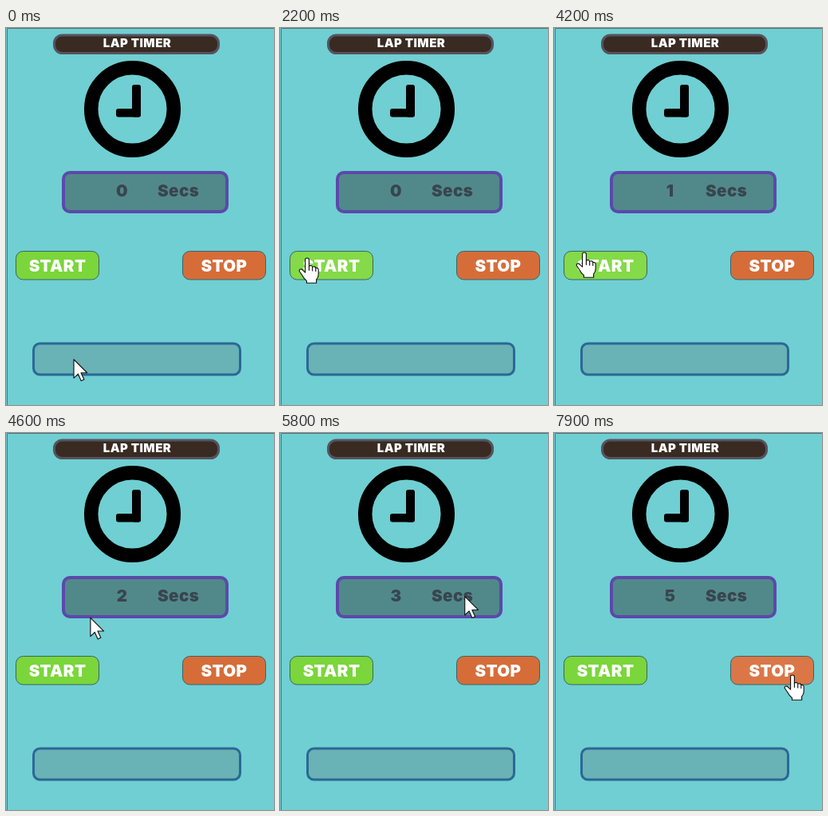
These frames come from a looping animation (336 px wide and 472 px high, 8 s). An HTML page:

```html
<!DOCTYPE html>
<html lang="en">
<head>
<meta charset="utf-8">
<title>Lap timer</title>
<style>
  html, body { margin: 0; width: 100%; height: 100%; overflow: hidden; background: #6fcfd2; }
  svg { display: block; width: 336px; height: 472px; }
  text { font: 900 20.5px Inter, "DejaVu Sans", sans-serif; letter-spacing: .02em; fill: #fff; }
  .middle { text-anchor: middle; }
  .title { font-size: 15px; letter-spacing: .03em; }
  .readout { fill: #38454f; }
  .button { stroke: #3c626b; stroke-width: 1; }
  .pointer { fill: #fff; stroke: #111; stroke-width: .8; stroke-linejoin: round; stroke-linecap: round; }
</style>
</head>
<body>
<svg viewBox="0 0 336 472">
  <rect width="336" height="472" fill="#6fcfd2"/>
  <path d="M336 .5H1.5V472" fill="none" stroke="#53717c"/>

  <rect x="60.5" y="9" width="206" height="22.5" rx="10" fill="#392b22" stroke="#56535f" stroke-width="3"/>
  <text class="title middle" x="164.5" y="24">LAP TIMER</text>

  <circle cx="158.5" cy="101.5" r="51.8" fill="none" stroke="#000" stroke-width="17.5"/>
  <rect x="158" y="71" width="11" height="40.5" rx="3"/>
  <rect x="138" y="101" width="31" height="10.5" rx="3"/>

  <rect x="72" y="181" width="205" height="49" rx="8" fill="#51898a" stroke="#5b49aa" stroke-width="4"/>
  <text id="count" class="readout middle" x="145.5" y="211">0</text>
  <text class="readout" x="190" y="211">Secs</text>

  <rect id="start" class="button" x="12.5" y="279.5" width="104" height="35.5" rx="9"/>
  <text class="middle" x="64.5" y="305">START</text>
  <rect id="stop" class="button" x="221.5" y="279.5" width="104" height="35.5" rx="9"/>
  <text class="middle" x="273.5" y="305">STOP</text>

  <rect x="34.5" y="395" width="259" height="39" rx="8" fill="#69b2b5" stroke="#2b6896" stroke-width="3"/>

  <g id="cursor" class="pointer">
    <path id="arrow" d="M0 0V16.4L3.8 12.8 6.5 18.8 9.1 17.6 6.4 11.8H11.8Z"/>
    <g id="hand">
      <path d="M-1.7 1.5Q-1.7 0 0 0T1.7 1.5V7Q4.2 6 4.7 7.8Q7.2 7 7.6 8.8Q10 8.4 10 10.6V14.5Q10 17 8.2 19V22H-.4V20.2Q-3 18-4.5 15L-6.7 11.8Q-7.3 10.4-6 9.9T-3.4 11.2L-1.7 12.8Z"/>
      <path fill="none" d="M1.7 7V10.8M4.7 7.8V11.2M7.6 8.8V11.6"/>
    </g>
  </g>
</svg>
<script>
const LOOP = 8000, STEP = 100;
const el = id => document.getElementById(id);
const [count, start, stop, cursor, arrow, hand] =
  ["count", "start", "stop", "cursor", "arrow", "hand"].map(el);

// Pointer stops: time, x, y
const route = [
  [0, 85, 415], [600, 34, 288], [4100, 34, 288], [4200, 38, 281],
  [4900, 150, 199], [5300, 153, 201], [5900, 238, 205], [6000, 239, 205],
  [6800, 239, 205], [6900, 240, 206], [7600, 299, 303], [LOOP, 299, 303]
];
// Stretches at rest before the next stop
const waits = { 600: 4100, 4900: 5000, 6000: 6800 };

const ease = p => p * p * (3 - 2 * p);

function pointerAt(t) {
  const i = route.findIndex(([end]) => t < end);
  const [from, x0, y0] = route[i - 1], [to, x1, y1] = route[i];
  const begin = Math.min(waits[from] ?? from, to);
  const p = t <= begin ? 0 : ease((t - begin) / (to - begin));
  return [x0 + (x1 - x0) * p, y0 + (y1 - y0) * p];
}

const over = (x, y, left) => x >= left && x <= left + 105 && y >= 279 && y <= 315;

function draw(time) {
  const t = Math.floor((time % LOOP) / STEP) * STEP;
  const [x, y] = pointerAt(t);
  const onStart = over(x, y, 12), onStop = over(x, y, 221);
  const pointing = onStart || onStop;

  count.textContent = Math.max(0, Math.floor((t - 2500) / 1000));
  start.setAttribute("fill", onStart ? "#84da48" : "#7ad63a");
  stop.setAttribute("fill", onStop ? "#db7747" : "#d66d39");
  cursor.setAttribute("transform", `translate(${x.toFixed(1)} ${y.toFixed(1)}) scale(1.42)`);
  arrow.style.display = pointing ? "none" : "";
  hand.style.display = pointing ? "" : "none";
}

const origin = performance.now();
function tick() {
  draw(performance.now() - origin);
  requestAnimationFrame(tick);
}
tick();
</script>
</body>
</html>
```
